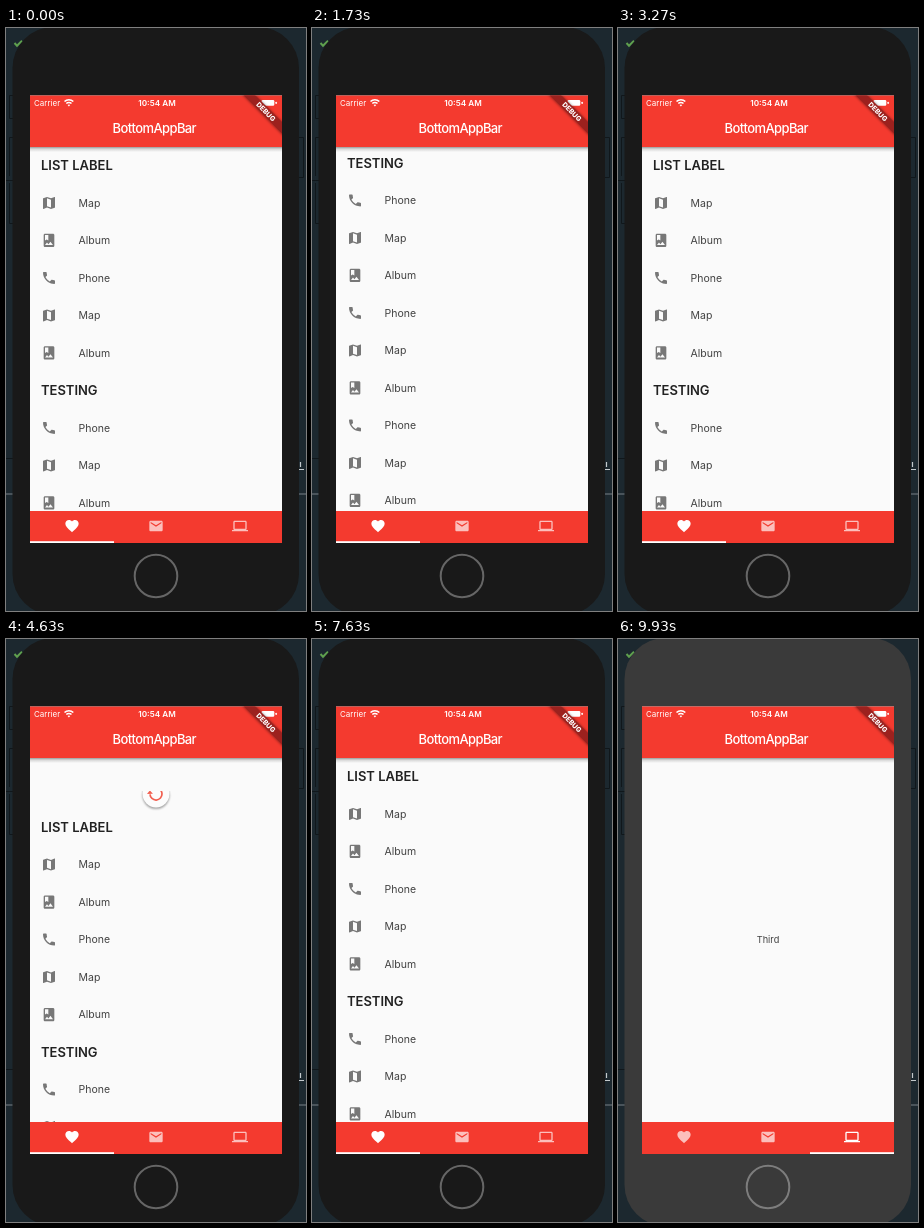
Recreate the animation shown at these times as an HTML page. Size 300 px wide and 583 px high, loop 9960 ms.

```html
<!DOCTYPE html>
<html lang="en">
<head>
<meta charset="utf-8">
<title>BottomAppBar</title>
<style>
html, body { margin: 0; width: 100%; height: 100%; overflow: hidden; background: #1c282f; }
svg { display: block; width: 100vw; height: 100vh; font-family: Inter, Roboto, sans-serif; }
</style>
</head>
<body>
<svg viewBox="0 0 300 583" xmlns="http://www.w3.org/2000/svg">
  <defs>
    <path id="map" d="M20.5 3l-.16.03L15 5.1 9 3 3.36 4.9c-.21.07-.36.25-.36.48V20.5c0 .28.22.5.5.5l.16-.03L9 18.9l6 2.1 5.64-1.9c.21-.07.36-.25.36-.48V3.5c0-.28-.22-.5-.5-.5zM15 19l-6-2.11V5l6 2.11V19z"/>
    <path id="album" d="M18 2H6c-1.1 0-2 .9-2 2v16c0 1.1.9 2 2 2h12c1.1 0 2-.9 2-2V4c0-1.1-.9-2-2-2zM6 4h5v8l-2.5-1.5L6 12V4zm0 15l3-3.86 2.14 2.58 3-3.86L18 19H6z"/>
    <path id="phone" d="M6.62 10.79c1.44 2.83 3.76 5.14 6.59 6.59l2.2-2.2c.27-.27.67-.36 1.02-.24 1.12.37 2.33.57 3.57.57.55 0 1 .45 1 1V20c0 .55-.45 1-1 1-9.39 0-17-7.61-17-17 0-.55.45-1 1-1h3.5c.55 0 1 .45 1 1 0 1.25.2 2.45.57 3.57.11.35.03.74-.25 1.02l-2.2 2.2z"/>
    <path id="heart" d="M12 21.35l-1.45-1.32C5.4 15.36 2 12.28 2 8.5 2 5.42 4.42 3 7.5 3c1.74 0 3.41.81 4.5 2.09C13.09 3.81 14.76 3 16.5 3 19.58 3 22 5.42 22 8.5c0 3.78-3.4 6.86-8.55 11.54L12 21.35z"/>
    <path id="mail" d="M20 4H4c-1.1 0-1.99.9-1.99 2L2 18c0 1.1.9 2 2 2h16c1.1 0 2-.9 2-2V6c0-1.1-.9-2-2-2zm0 4l-8 5-8-5V6l8 5 8-5v2z"/>
    <path id="laptop" d="M20 18c1.1 0 1.99-.9 1.99-2L22 6c0-1.1-.9-2-2-2H4c-1.1 0-2 .9-2 2v10c0 1.1.9 2 2 2H0v2h24v-2h-4zM4 6h16v10H4V6z"/>
    <clipPath id="body"><rect x="24" y="118" width="252" height="365"/></clipPath>
    <clipPath id="screen"><rect x="24" y="67.5" width="252" height="447.5"/></clipPath>
    <clipPath id="pull"><rect x="124" y="152" width="52" height="80"/></clipPath>
    <linearGradient id="shade" x2="0" y2="1">
      <stop offset="0" stop-opacity=".38"/><stop offset=".4" stop-opacity=".14"/><stop offset="1" stop-opacity="0"/>
    </linearGradient>
    <filter id="soft" x="-30%" y="-30%" width="160%" height="160%"><feGaussianBlur stdDeviation="1.2"/></filter>
  </defs>

  <rect width="300" height="583" fill="#1c282f"/>
  <g fill="none" stroke="#10171b">
    <path d="M8 67.5H3.5V90.500H8M8 109.500H3.500V148M3.500 155V195.500H8M292 109.500H297.500V149.500H292M0 152.500H8M0 430.500H8"/>
    <path d="M0 466H8M291 466H300" stroke="#59636a" stroke-width="1.5"/>
    <path d="M291 441.500H298M294.500 434V439" stroke="#c3c9cc" stroke-width="1.200"/>
    <path d="M8.500 15l2.500 2.700 5-5" stroke="#5fa04e" stroke-width="2"/>
  </g>

  <rect id="case" x="6.500" y="-1" width="286.500" height="588" rx="41"/>
  <circle id="home" cx="150" cy="548" r="21.300" fill="none" stroke-width="2"/>

  <g clip-path="url(#screen)">
    <rect x="24" y="67" width="252" height="448" fill="#fafafa"/>
    <g clip-path="url(#body)">
      <g id="pages" fill="#424242">
        <g id="list"></g>
        <text x="402" y="303.500" font-size="9.200" text-anchor="middle">Second</text>
        <text x="654" y="303.500" font-size="9.200" text-anchor="middle">Third</text>
      </g>
      <g clip-path="url(#pull)">
        <g id="knob">
          <circle cy="1.300" r="13.500" opacity=".38" filter="url(#soft)"/>
          <circle r="13.400" fill="#fcfcfc"/>
          <g id="turn">
            <path id="arc" fill="none" stroke="#f04432" stroke-width="1.700"/>
            <path id="tip" d="M-9-3h6l-3-3.400z" fill="#f04432"/>
          </g>
        </g>
      </g>
      <rect x="24" y="119" width="252" height="5" fill="url(#shade)"/>
    </g>

    <rect x="24" y="67" width="252" height="52" fill="#f43a2f"/>
    <g fill="#fff">
      <text x="28" y="77.600" font-size="8">Carrier</text>
      <text x="151" y="77.700" font-size="8.200" font-weight="600" text-anchor="middle">10:54 AM</text>
      <text x="148.300" y="104.700" font-size="13" font-weight="500" letter-spacing="-.6" text-anchor="middle">BottomAppBar</text>
      <g fill="none" stroke="#fff" stroke-width="1.500">
        <path d="M58.500 73.600a6 6 0 0 1 8.800 0M60.300 75.600a3.600 3.600 0 0 1 5.200 0"/>
      </g>
      <path d="M61.600 77l1.300 1.500 1.300-1.500a2 2 0 0 0-2.600 0z"/>
      <rect x="255.500" y="72" width="12.800" height="5.800" rx="1.200"/>
      <rect x="269.500" y="73.700" width="1.300" height="2.400" rx=".6"/>
    </g>
    <g transform="translate(276 67.500) rotate(45)">
      <rect x="-40" y="18.500" width="80" height="9" opacity=".4" filter="url(#soft)"/>
      <rect x="-40" y="18.800" width="80" height="8.100" fill="#9c211e"/>
      <text y="25.300" font-size="6.900" font-weight="800" fill="#fff" text-anchor="middle">DEBUG</text>
    </g>

    <rect x="24" y="483" width="252" height="32" fill="#f43a2f"/>
    <g id="tabs" fill="#fff"></g>
    <rect id="bar" y="513.200" width="84" height="1.800" x="24" fill="#fff"/>
  </g>
</svg>
<script>
const LOOP = 9960, ROW = 37.5, PAGE = 252;
const $ = id => document.getElementById(id);
const set = (id, name, value) => $(id).setAttribute(name, value);
const clamp = x => Math.min(1, Math.max(0, x));
const span = (t, a, b) => clamp((t - a) / (b - a));
const ease = x => x * x * (3 - 2 * x);
const icon = (name, x, y, extra = '') =>
  `<use href="#${name}" transform="translate(${x - 8} ${y - 8}) scale(.6667)" ${extra}/>`;

const labels = { map: 'Map', album: 'Album', phone: 'Phone' };
const kinds = Object.keys(labels);

function rowMarkup(i) {
  const y = 137.4 + ROW * i;
  if (i % 6 === 0 && i < 7) {
    return `<text x="35" y="${y + 4.8}" font-size="13" font-weight="600" fill="#212121">${i ? 'TESTING' : 'LIST LABEL'}</text>`;
  }
  const kind = kinds[(i < 6 ? i - 1 : i - 5) % 3];
  return icon(kind, 43, y, 'fill="#777"') +
    `<text x="72.500" y="${y + 3.9}" font-size="10.500">${labels[kind]}</text>`;
}
$('list').innerHTML = Array.from({ length: 19 }, (_, i) => rowMarkup(i)).join('');
$('tabs').innerHTML = ['heart', 'mail', 'laptop'].map((n, i) => icon(n, 66 + 84 * i, 498)).join('');

// Positive values pull the list below its resting place.
function listShift(t) {
  if (t < 3500) return -227.5 * (ease(span(t, 350, 1500)) - ease(span(t, 1950, 3000)));
  if (t < 5250) return 92 * ease(span(t, 3750, 5400));
  return listShift(5249) * Math.exp((5250 - t) / 107);
}

function drawKnob(t, shift) {
  const shown = t > 3750 && t < 7050;
  set('knob', 'display', shown ? 'inline' : 'none');
  if (!shown) return;
  const spin = Math.max(0, t - 5650);
  const drag = clamp(shift / 92);
  const settle = ease(span(t, 5250, 5450));
  const pulled = 138 + 30 * clamp((t < 5250 ? drag : 1) / .97);
  const y = pulled + (162 - pulled) * settle;
  const size = 1 - span(t, 6850, 7050);
  set('knob', 'transform', `translate(150 ${y}) scale(${size})`);
  set('turn', 'opacity', t < 5250 ? clamp(.3 + drag) : 1);

  const sweep = spin ? 150 + 120 * Math.cos(spin / 1333 * Math.PI * 2) : 270;
  const a = (180 - sweep) * Math.PI / 180;
  const from = `${6 * Math.cos(a)} ${6 * Math.sin(a)}`;
  set('arc', 'd', `M${from}A6 6 0 ${sweep > 180 ? 1 : 0} 1 -6 0`);
  const lean = t < 5250 ? 60 * (drag - .6) : 0;
  set('turn', 'transform', `rotate(${lean + spin * .4})`);
  set('tip', 'transform', 'translate(0 2.500)');
  set('tip', 'opacity', 1 - clamp(spin / 150));
}

function draw(t) {
  const shift = listShift(t);
  set('list', 'transform', `translate(0 ${shift})`);
  drawKnob(t, shift);

  const page = ease(span(t, 8300, 8600)) + ease(span(t, 9100, 9400));
  set('pages', 'transform', `translate(${-PAGE * page} 0)`);
  set('bar', 'x', 24 + 84 * page);
  [...$('tabs').children].forEach((tab, i) =>
    tab.setAttribute('opacity', .68 + .32 * clamp(1 - Math.abs(page - i))));

  const idle = t >= 9700;
  set('case', 'fill', idle ? '#3a3a3a' : '#191919');
  set('home', 'stroke', idle ? '#7d7d7d' : '#666');
}

const start = performance.now();
function tick() {
  draw((performance.now() - start) % LOOP);
  requestAnimationFrame(tick);
}
draw(0);
requestAnimationFrame(tick);
</script>
</body>
</html>
```
